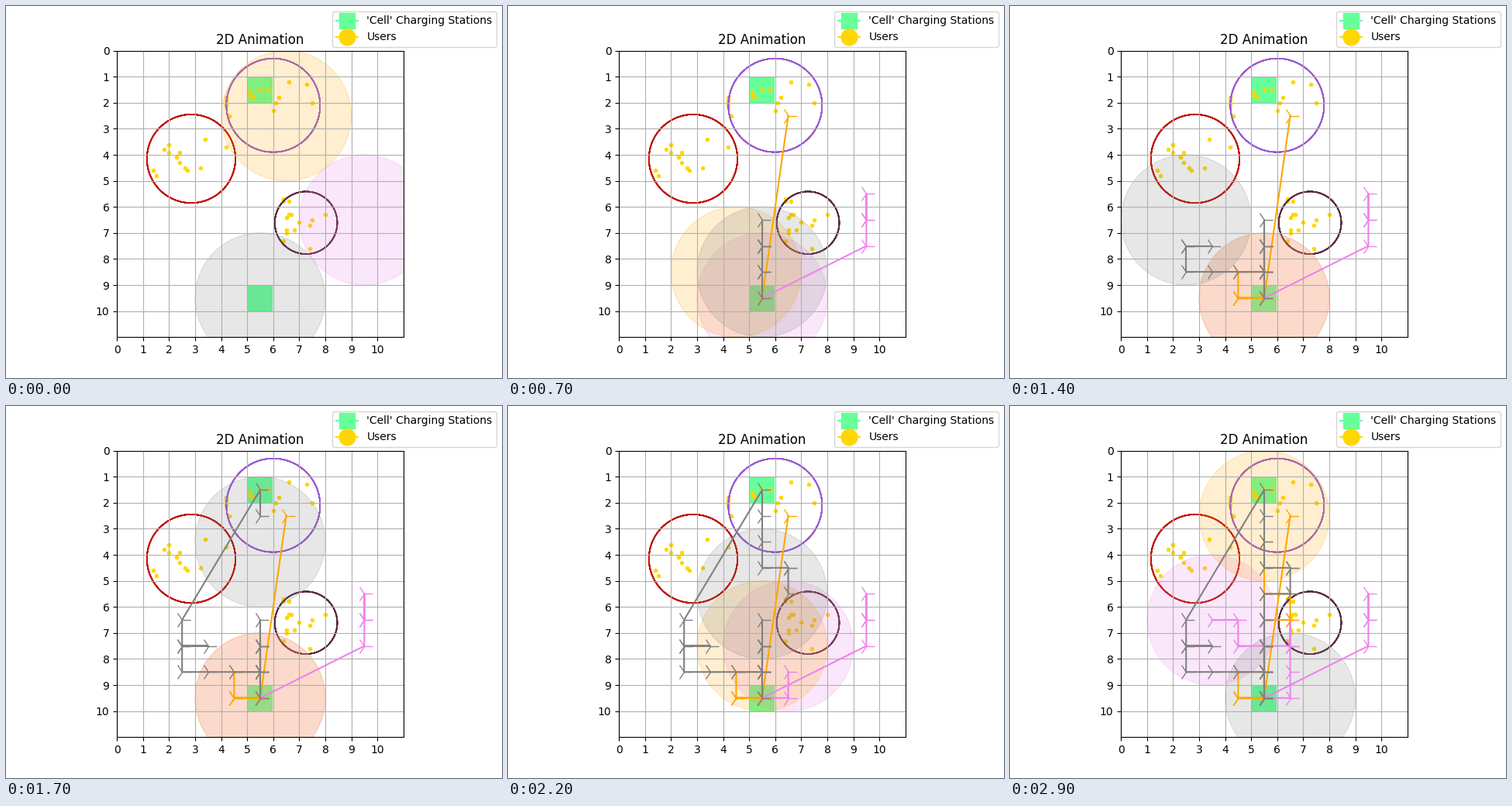
These frames come from a looping animation (640 by 480 pixels, 3 s). A matplotlib script:

```python
import numpy as np
import matplotlib.pyplot as plt
from matplotlib.animation import FuncAnimation
from matplotlib.lines import Line2D
from matplotlib.patches import Circle, Rectangle

FRAMES, INTERVAL = 30, 100
SIZE = 11
USERS = 15
GREEN, GOLD = "#66ff99", "#ffd700"
STATIONS = {"T": (5.5, 1.5), "B": (5.5, 9.5)}
STEPS = {"u": (0, -1), "d": (0, 1), "l": (-1, 0), "r": (1, 0), ".": (0, 0)}

# Colour, start cell, one move per frame; T and B jump to a charging station.
AGENTS = [
    ("violet", (9.5, 6.5), "uddB.....ud........ruuudllul."),
    ("orange", (6.5, 2.5), "B....uld.rlr........uuuruluuu"),
    ("gray", (5.5, 9.5), "uuduuddlllurluTdddr.dldddd..r"),
]

# Outline centre, radius and colour, then mean and spread of the users inside.
CLUSTERS = [
    ((6.0, 2.1), 1.8, "#9b59d0", (5.8, 1.8), (1.0, 0.3)),
    ((2.85, 4.15), 1.7, "#c01000", (2.6, 4.0), (0.8, 0.6)),
    ((7.26, 6.61), 1.2, "#5a2a3c", (7.0, 6.4), (0.5, 0.5)),
]


def scatter_users(rng, centre, radius, mean, spread):
    """Random users on a 0.1 grid, pulled inside their cluster's outline."""
    offset = rng.normal(mean, spread, (USERS, 2)) - centre
    reach = np.hypot(*offset.T)[:, None]
    return np.round(centre + offset * np.minimum(1, radius / reach), 1)


def walk(start, moves):
    """Positions of an agent, one per frame."""
    path = [start]
    for move in moves:
        if move in STATIONS:
            path.append(STATIONS[move])
        else:
            (x, y), (dx, dy) = path[-1], STEPS[move]
            path.append((x + dx, y + dy))
    return np.array(path)


fig, ax = plt.subplots(figsize=(6.4, 4.8), dpi=100)
ax.set_aspect("equal")
ax.set_xlim(0, SIZE)
ax.set_ylim(SIZE, 0)
ax.set_xticks(range(SIZE))
ax.set_yticks(range(SIZE))
ax.grid(True)
ax.set_title("2D Animation")

for x, y in STATIONS.values():
    ax.add_patch(Rectangle((x - 0.5, y - 0.5), 0.97, 1, color=GREEN, lw=0))

rng = np.random.default_rng(4)
for centre, radius, colour, mean, spread in CLUSTERS:
    users = scatter_users(rng, centre, radius, mean, spread)
    ax.scatter(*users.T, marker=".", color=GOLD)
    # Every user repeats the outline, which hardens its edge.
    for _ in users:
        ax.add_patch(Circle(centre, radius, fill=False, ec=colour, lw=1))

agents = []
for colour, start, moves in AGENTS:
    disc = ax.add_patch(Circle(start, 2.5, color=colour, alpha=0.19))
    trail, = ax.plot([], [], color=colour, marker="4", markersize=16, lw=1.5)
    agents.append((walk(start, moves), disc, trail))

fig.legend(handles=[
    Line2D([], [], color=GREEN, marker="s", markersize=15,
           label="'Cell' Charging Stations"),
    Line2D([], [], color=GOLD, marker="o", markersize=15, label="Users"),
], loc="upper right")


def update(frame):
    # The trail stays one step behind the disc.
    for path, disc, trail in agents:
        disc.center = path[frame]
        trail.set_data(path[:frame, 0], path[:frame, 1])
    return [artist for agent in agents for artist in agent[1:]]


anim = FuncAnimation(fig, update, frames=FRAMES, interval=INTERVAL,
                     repeat=True, repeat_delay=0, blit=False)
plt.show()
```
